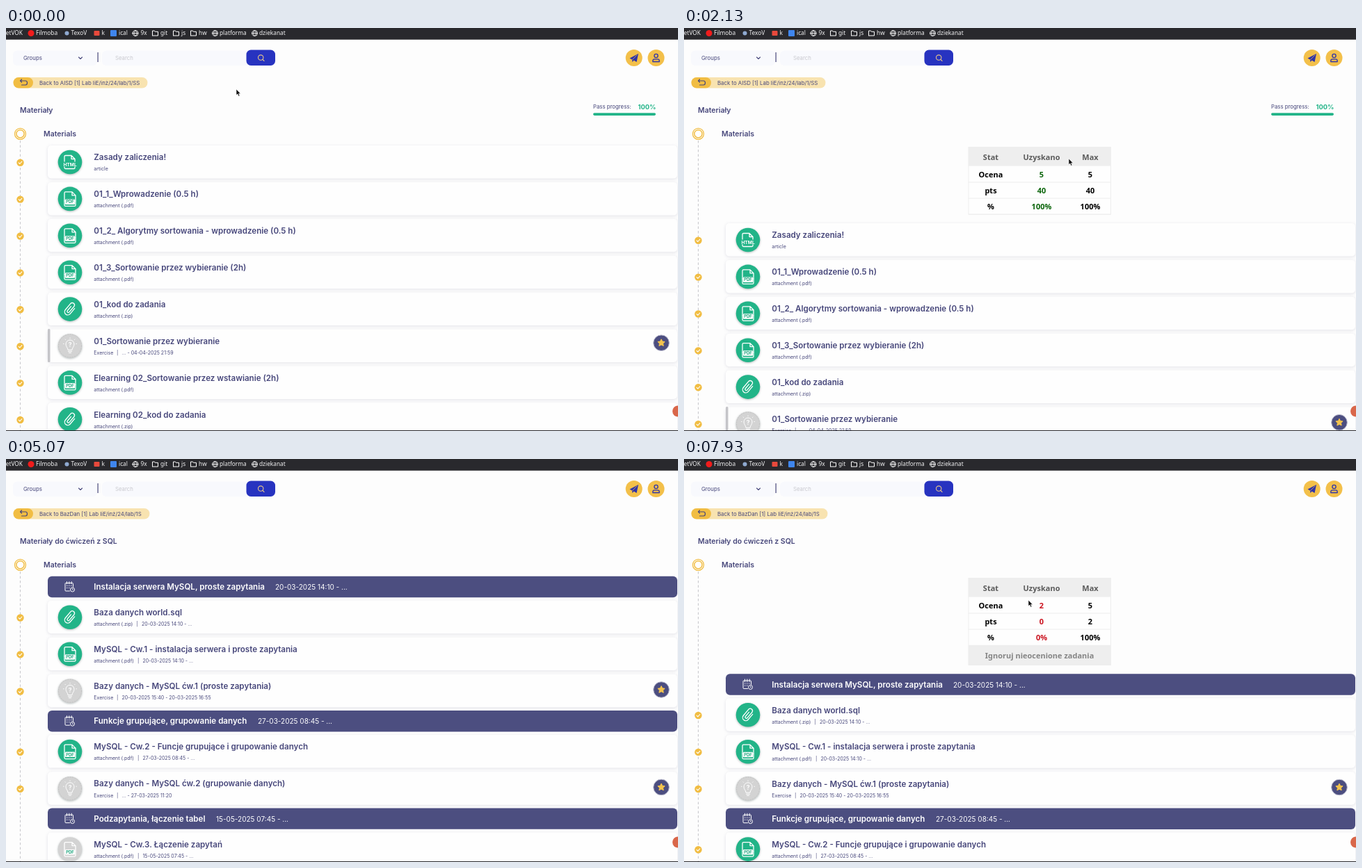
An HTML page for the animation above (8000 ms loop, 966 px wide and 580 px high).

```html
<!DOCTYPE html>
<html lang="pl">
<head>
<meta charset="utf-8">
<title>Course materials</title>
<style>
html, body { margin: 0; width: 100%; height: 100%; overflow: hidden; background: #fdfdfd; }
svg { display: block; width: 100%; height: 100%; }
text { white-space: pre; font-family: Inter, sans-serif; fill: #47477b; }
.title { font-size: 11.6px; font-weight: 600; }
.head { font-size: 10.5px; font-weight: 600; }
.sub { font-size: 7px; }
.ui { font-size: 7.8px; }
.date { font-size: 10px; fill: #fff; }
.white { fill: #fff; }
.bar { font: 8.3px "Noto Sans", sans-serif; fill: #f1f1f2; }
.cell { font: bold 11px "Noto Sans", sans-serif; text-anchor: middle; fill: #000; }
.link { font: 8.05px "Noto Sans", sans-serif; fill: #4aa3cf; }
.tag { font-weight: 700; text-anchor: middle; }
.line { fill: none; stroke: #fff; stroke-width: 1.3; stroke-linecap: round; stroke-linejoin: round; }
.card { fill: #fefefe; filter: drop-shadow(0 1px 2px rgba(70, 70, 110, .15)); }
.disc { filter: drop-shadow(0 1px 1.5px rgba(40, 60, 60, .35)); }
</style>
</head>
<body>
<svg id="stage" viewBox="0 0 966 580" xmlns="http://www.w3.org/2000/svg"></svg>
<script>
const LOOP = 8000, GREEN = '#22b488', GOLD = '#f1bd43', NAVY = '#4c4e80';
const stage = document.getElementById('stage');

const esc = s => s.replace(/&/g, '&amp;').replace(/</g, '&lt;');
const text = (x, y, s, cls, more = '') => `<text x="${x}" y="${y}" class="${cls}" ${more}>${esc(s)}</text>`;
const rect = (x, y, w, h, fill, r = 0, more = '') =>
  `<rect x="${x}" y="${y}" width="${w}" height="${h}" rx="${r}" fill="${fill}" ${more}/>`;
const circle = (x, y, r, fill, more = '') => `<circle cx="${x}" cy="${y}" r="${r}" fill="${fill}" ${more}/>`;
const line = (d, more = '') => `<path class="line" d="${d}" ${more}/>`;
const at = (x, y, body) => `<g transform="translate(${x} ${y})">${body}</g>`;

const sheet = line('M-8 3V-8.5Q-8-10-6.500-10H3L8-5V3M3-10V-5H8');
const icons = {
  pdf: sheet + line('M-8 3V9Q-8 10.500-6.500 10.500H6.500Q8 10.500 8 9V3') +
    rect(-7, .5, 14, 7.5, '#fff', 1) + text(0, 6.5, 'PDF', 'tag', 'style="font-size:6px;fill:#22a780"'),
  html: line('M-8-1V-8Q-8-9.500-6.500-9.500H2L7-4.500V-1M2-9.500V-4.500H7M-8 7V8Q-8 9.500-6.500 9.500H5.500Q7 9.500 7 8V7') +
    text(0, 6, 'HTML', 'tag', 'style="font-size:6.6px;fill:#fff"'),
  clip: `<g transform="rotate(40)">${line('M4.500-5V5A4.500 4.500 0 0 1-4.500 5V-7A3.300 3.300 0 0 1 2-7V4A1.700 1.700 0 0 1-1.400 4V-4')}</g>`,
  bulb: line('M-3 5.500C-3 2.500-6 1.500-6-2.500A6 6 0 0 1 6-2.500C6 1.500 3 2.500 3 5.500ZM-2.500 8H2.500M-1.500 10H1.500M0-11.500V-11M-9-3H-9.500M9-3H9.500M-6.500-9L-7-9.500M6.500-9L7-9.500', 'style="stroke-width:1"') +
    text(0, 1.7, '?', 'tag', 'style="font-size:8.500px;fill:#fff"'),
  calendar: line('M5 0V-4.500Q5-5.500 4-5.500H-5.500Q-6.500-5.500-6.500-4.500V5Q-6.500 6 -5.500 6H0M-4-7.500V-4M-.7-7.500V-4M2.700-7.500V-4M-4-1.500H-3.500M-1-1.500H-.5M2-1.500H2.500M-4 1.500H-3.500M-1 1.500H-.5', 'style="stroke-width:1"') +
    circle(4, 4, 3, NAVY, 'stroke="#fff"') + line('M4 2.500V4.200H5', 'style="stroke-width:.7"')
};

function star() {
  let d = '';
  for (let i = 0; i < 10; i++) {
    const a = i * Math.PI / 5 - Math.PI / 2, r = i % 2 ? 2.7 : 5.4;
    d += (i ? 'L' : 'M') + (r * Math.cos(a)).toFixed(2) + ' ' + (r * Math.sin(a)).toFixed(2);
  }
  return circle(0, 0, 11.3, NAVY, 'stroke="#b9b9cc" stroke-width="1"') +
    `<path d="${d}Z" fill="#f4c34d" stroke="#f4c34d" stroke-linejoin="round"/>`;
}

function row({ y, icon, name, kind, date, dateX = 166.5, off, side }) {
  let s = rect(60, y - 24, 905, 47.5, '#fefefe', 5, 'class="card"');
  if (side) s += rect(60, y - 24.5, 3.5, 48, '#c5c5c9', 1.5);
  const gray = off || icon === 'bulb';
  s += circle(92, y, 17.3, gray ? '#d3d3d3' : GREEN, 'class="disc"');
  if (icon === 'bulb') s += circle(92, y, 16.5, 'none', 'stroke="#bfbfbf" stroke-dasharray="2 1.5" stroke-width=".8"');
  s += at(92, y, icons[icon]);
  s += text(126.3, y - 2.8, name, 'title') + text(126.3, y + 12.3, kind, 'sub');
  if (date) s += text(dateX - 7.5, y + 12.3, '|', 'sub') + text(dateX, y + 12.3, date, 'sub');
  if (!off) s += circle(20.5, y + .7, 5.2, GOLD) + line(`M18.200 ${y + .8}l1.700 1.700 3-3.300`, 'style="stroke-width:1.100"');
  if (icon === 'bulb') s += at(942, y - 1.8, `<g class="star">${star()}</g>`);
  return s;
}

const band = (y, name, x, date) => rect(60, y - 15.2, 905, 30.4, NAVY, 6) + at(91.5, y, icons.calendar) +
  text(126.3, y + 4.2, name, 'title white') + text(x, y + 4.2, date, 'date');

function table(got, max, color, extra) {
  const cols = [441, 514, 584];
  const cells = (y, list, fills) => list.map((s, i) => text(cols[i], y, s, 'cell', `style="fill:${fills[i]}"`)).join('');
  let s = rect(409, 171.5, 204.5, extra ? 125 : 96.5, '#fefefe', 0, 'stroke="#eee"') + rect(409, 171, 204.5, 27.5, '#eeeeee');
  s += cells(189.8, ['Stat', 'Uzyskano', 'Max'], Array(3).fill('#5b5b5b'));
  ['Ocena', 'pts', '%'].forEach((n, i) => {
    const y = 214.8 + i * 23.1;
    s += cells(y, [n, got[i], max[i]], ['#000', color, '#000']) + rect(409, y + 6.7, 204.5, 1, '#ededed');
  });
  if (extra) s += rect(409, 268, 204.5, 28.500, '#eeeeee') + text(511, 287, extra, 'cell', 'style="fill:#858585"');
  return s;
}

function page(id, back, backEnd, title, body, stats, extra) {
  return `<g id="page${id}">` +
    rect(10.5, 71, backEnd - 10.5, 15.5, '#f8e3b0', 7.7) + rect(10.5, 71, 28.5, 15.5, GOLD, 7.7) +
    line('M20.500 76H28Q30.500 76 30.500 79T28 82H22.500M22.500 74L20.500 76L22.500 78', 'style="stroke:#47477b;stroke-width:1.200"') +
    text(48, 81.7, back, 'ui') + text(20, 121.6, title, 'head') + text(54, 155.6, 'Materials', 'head') +
    '<path d="M20.500 162V580" stroke="#c6c6cb" stroke-dasharray="3.500 3"/>' +
    circle(20.5, 152.3, 8, '#fefefe', `stroke="${GOLD}" stroke-width="1.300"`) +
    circle(20.5, 152.3, 5.6, '#fefefe', `stroke="${GOLD}" stroke-width="1.500"`) +
    (extra || '') + `<g id="table${id}">${stats}</g><g id="body${id}">${body}</g></g>`;
}

const pdf = 'attachment (.pdf)', zip = 'attachment (.zip)';
const first = [
  ['html', 'Zasady zaliczenia!', 'article'],
  ['pdf', '01_1_Wprowadzenie (0.5 h)', pdf],
  ['pdf', '01_2_ Algorytmy sortowania - wprowadzenie (0.5 h)', pdf],
  ['pdf', '01_3_Sortowanie przez wybieranie (2h)', pdf],
  ['clip', '01_kod do zadania', zip],
  ['bulb', '01_Sortowanie przez wybieranie', 'Exercise', '... - 04-04-2025 21:59'],
  ['pdf', 'Elearning 02_Sortowanie przez wstawianie (2h)', pdf],
  ['clip', 'Elearning 02_kod do zadania', zip]
].map(([icon, name, kind, date], i) => row({ y: 193 + 52.9 * i, icon, name, kind, date, side: !!date })).join('');

const second = band(184, 'Instalacja serwera MySQL, proste zapytania', 387, '20-03-2025 14:10 - ...') +
  row({ y: 227.8, icon: 'clip', name: 'Baza danych world.sql', kind: zip, date: '20-03-2025 14:10 - ...', dateX: 195 }) +
  row({ y: 280.7, icon: 'pdf', name: 'MySQL - Cw.1 - instalacja serwera i proste zapytania', kind: pdf, date: '20-03-2025 14:10 - ...', dateX: 196.500 }) +
  row({ y: 333.8, icon: 'bulb', name: 'Bazy danych - MySQL ćw.1 (proste zapytania)', kind: 'Exercise', date: '20-03-2025 15:40 - 20-03-2025 16:55' }) +
  band(377.2, 'Funkcje grupujące, grupowanie danych', 362, '27-03-2025 08:45 - ...') +
  row({ y: 421.1, icon: 'pdf', name: 'MySQL - Cw.2 - Funcje grupujące i grupowanie danych', kind: pdf, date: '27-03-2025 08:45 - ...', dateX: 196.500 }) +
  row({ y: 474.2, icon: 'bulb', name: 'Bazy danych - MySQL ćw.2 (grupowanie danych)', kind: 'Exercise', date: '... - 27-03-2025 11:20' }) +
  band(517.6, 'Podzapytania, łączenie tabel', 302, '15-05-2025 07:45 - ...') +
  row({ y: 561.6, icon: 'pdf', name: 'MySQL - Cw.3. Łączenie zapytań', kind: pdf, date: '15-05-2025 07:45 - ...', dateX: 196.500, off: true });

const progress = text(844, 116.2, 'Pass progress:', 'ui') +
  text(908.5, 116.7, '100%', 'ui', `style="font-size:9.300px;font-weight:700;fill:${GREEN}"`) + rect(844, 122.3, 90, 3.6, GREEN, 1.8);

function globe(x) {
  return at(x, 7.5, line('M-4 0A4 4 0 1 1 4 0A4 4 0 1 1-4 0ZM-4 0H4M0-4C-2.500-1.500-2.500 1.500 0 4C2.500 1.500 2.500-1.500 0-4', 'style="stroke-width:.9"'));
}
const folder = x => at(x, 7.5, line('M-4 3V-3.500H-1L0-2.200H4V3.500H-4Z', 'style="stroke-width:1"'));

const bookmarks = rect(0, 0, 966, 16.7, '#29292d') + rect(293, 0, 54.5, 15, '#58585c', 2, 'id="hover"') +
  [[-.3, 'etVOK'], [43, 'Filmoba'], [93.500, 'TexoV'], [137.500, 'k'], [162, 'ical'], [193.500, '9x'], [222, 'git'],
   [252, 'js'], [277, 'hw'], [307, 'platforma'], [364, 'dziekanat']].map(([x, s]) => text(x, 10.4, s, 'bar')).join('') +
  circle(36, 7.5, 4.5, '#f01c1c') + circle(87.5, 7.5, 3, '#8fa9d0') + rect(126.5, 4, 8, 7, '#e8493c', 1) + rect(150, 3, 9, 9, '#3f86ee', 1) +
  [186, 300.500, 357.500].map(globe).join('') + [214.500, 244.500, 269.500].map(folder).join('');

const blue = 'style="stroke:#3034a8;stroke-width:1.300"';
const topBar = rect(10, 32.5, 121, 21.500, '#f8f9fd', 6) + rect(138, 32.5, 220, 21.500, '#f8f9fd', 6) +
  text(25, 46, 'Groups', 'ui') + line('M104.500 42L107 44.500L109.500 42', 'style="stroke:#47477b;stroke-width:1.100"') +
  rect(131.5, 35, 1.2, 14, '#47477b') + text(157, 46.3, 'Search', 'ui', 'style="fill:#c9c9cf"') +
  rect(345.5, 31.5, 41.5, 22.500, '#2733c0', 6.5) +
  circle(366.2, 42.6, 3.7, 'none', 'stroke="#e5c489" stroke-width="1.100"') + line('M369 45.400L371 47.400', 'style="stroke:#e5c489"') +
  circle(902.7, 43, 12, '#f3c04a') + '<path d="M896.500 43.500L909 37L906.500 49L902.500 46.500L900.500 49L900 45.500Z" fill="#3034a8"/>' +
  line('M900.500 45.500L907 39', 'style="stroke:#f3c04a;stroke-width:.7"') +
  circle(934.5, 43, 12, '#f3c04a') + circle(934.5, 40, 2.6, 'none', blue) + line('M929.800 48.500V47Q930 44.800 932 44.800H937Q939 44.800 939.200 47V48.500Z', blue);

const code = 'nts = 0, totalPercentage = 0, taskCount = 0, includeUnscoredTasks = false, tableWidth = 0; const updateTable =...' +
  'Table.style.display = "table"; toggleTable.style.width = `${tableWidth}px`; } else if (toggleTable) { toggleTable.remove(); } }; updateTable(); })(); void';

stage.innerHTML = rect(0, 0, 966, 580, '#fdfdfd') +
  page(0, 'Back to AISD [1] Lab IiE/inż/24/lab/1/SS', 203.5, 'Materiały', first, table(['5', '40', '100%'], ['5', '40', '100%'], '#0a640a'), progress) +
  page(1, 'Back to BazDan [1] Lab IiE/inż/24/lab/1S', 206.5, 'Materiały do ćwiczeń z SQL', second,
    table(['2', '0', '0%'], ['5', '2', '100%'], '#cb1420', 'Ignoruj nieocenione zadania')) +
  topBar + circle(966, 551.5, 8, '#d9674a') + bookmarks + rect(0, 579, 966, 1, '#29292d') +
  `<g id="status">${rect(0, 567.5, 966, 12.5, '#14171d')}${text(-1, 577, code, 'link')}</g>` +
  '<path id="cursor" d="M0 0V8.600L2 7L3.400 10.200L5 9.500L3.600 6.400H6.200Z" fill="#111" stroke="#fff" stroke-width=".6"/>';

const $ = id => document.getElementById(id);
const show = (id, on) => $(id).setAttribute('visibility', on ? 'inherit' : 'hidden');
const smooth = u => u * u * (3 - 2 * u);

// pointer path: time, x, y
const path = [
  [0, 331, 88], [150, 331, 88], [850, 325, 15], [1200, 323, 11], [1480, 323, 11], [1800, 440, 70], [2130, 553, 188],
  [2600, 527, 211], [2900, 505, 240], [3150, 470, 257], [3470, 446, 213], [3530, 446, 213], [3800, 352, -12],
  [5530, 352, -12], [5780, 342, 9], [6100, 332, 11], [6520, 332, 11], [6900, 440, 100], [7250, 515, 186], [7800, 495, 203], [8000, 495, 203]
];
function pointer(t) {
  let i = 0;
  while (i < path.length - 2 && t >= path[i + 1][0]) i++;
  const [a, x, y] = path[i], [b, u, v] = path[i + 1], k = smooth((t - a) / (b - a));
  return [x + (u - x) * k, y + (v - y) * k];
}

function draw(t) {
  const sql = t >= 4330;
  const open = sql ? t >= 6600 : t >= 1500;
  const [x, y] = pointer(t);
  const over = x > 293 && x < 348 && y > 0 && y < 15.5;
  show('page0', !sql);
  show('page1', sql);
  show('table0', open);
  show('table1', open);
  $('body0').setAttribute('transform', `translate(0 ${open ? 112 : 0})`);
  $('body1').setAttribute('transform', `translate(0 ${open ? 140.5 : 0})`);
  const lift = -2.5 * (1 - smooth(Math.min(1, Math.max(0, (t - 70) / 430))));
  stage.querySelectorAll('.star').forEach(s => s.setAttribute('transform', `translate(0 ${lift})`));
  show('hover', over);
  show('status', over && (t > 950 && t < 2000 || t > 5850));
  show('cursor', y > -11);
  $('cursor').setAttribute('transform', `translate(${x.toFixed(2)} ${y.toFixed(2)})`);
}

const start = performance.now();
function tick() {
  draw((performance.now() - start) % LOOP);
  requestAnimationFrame(tick);
}
draw(0);
requestAnimationFrame(tick);
</script>
</body>
</html>
```
